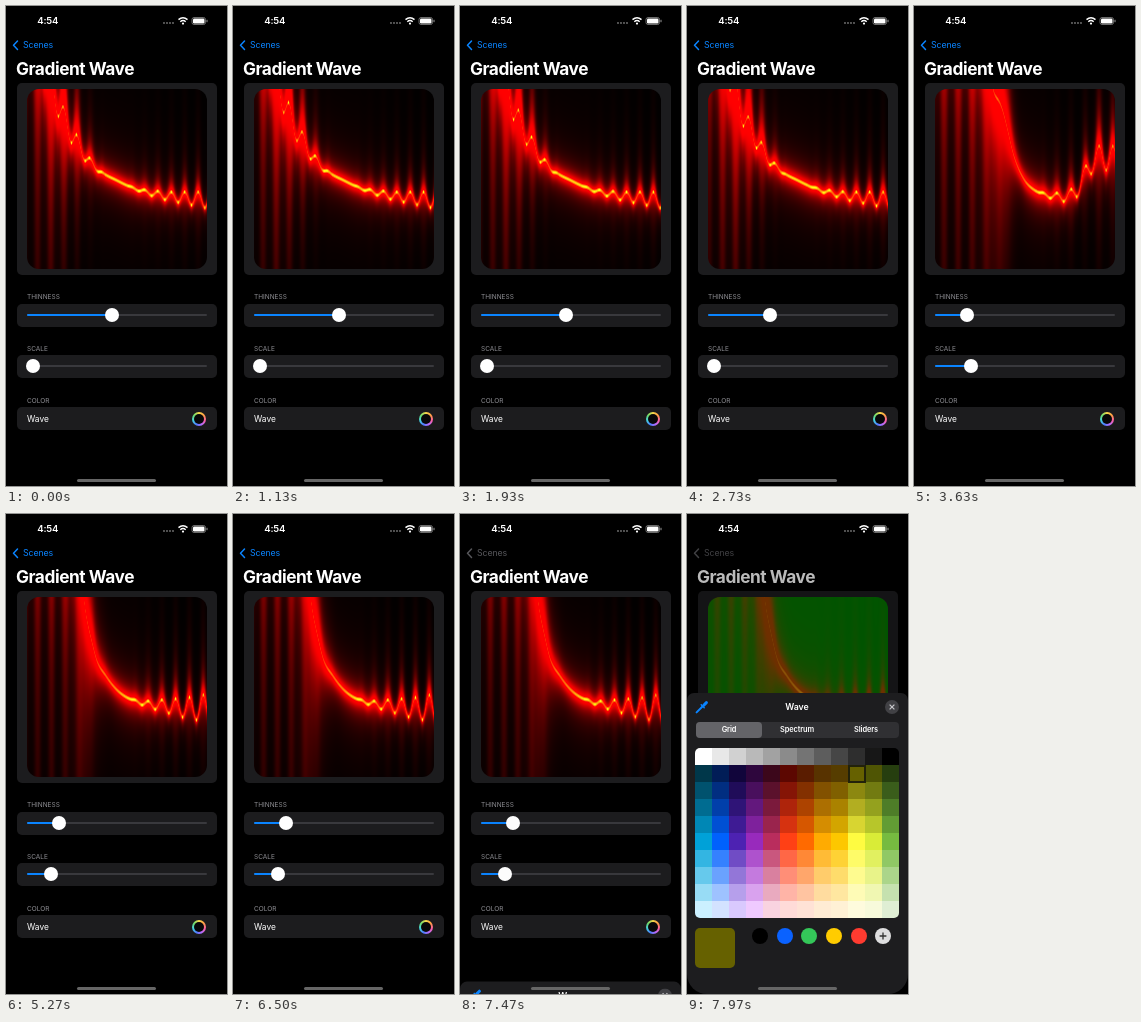
Animation, 221 px wide and 480 px high, one loop 8000 ms. Source, as an HTML page with a canvas:

```html
<!DOCTYPE html>
<html lang="en">
<head>
<meta charset="utf-8">
<title>Gradient Wave</title>
<style>
html, body { margin: 0; width: 100%; height: 100%; overflow: hidden; background: #000; }
#stage { position: relative; width: 221px; height: 480px; overflow: hidden; background: #000; color: #fff; font-family: Inter, Roboto, sans-serif; }
#stage * { position: absolute; box-sizing: border-box; }
.t { white-space: nowrap; line-height: 12px; }
.time { left: 31.3px; top: 9px; font-size: 9.6px; font-weight: 600; letter-spacing: -.2px; }
.status { left: 0; top: 0; }
.back { left: 17px; top: 33px; font-size: 8.8px; letter-spacing: -.1px; color: #0a84ff; }
.title { left: 10px; top: 53px; line-height: 20px; font-size: 17.3px; font-weight: 700; letter-spacing: -.45px; }
.card { left: 11px; width: 200px; height: 23px; border-radius: 5px; background: #1c1c1e; }
.label { left: 21px; font-size: 6.5px; color: #8e8e93; }
canvas { left: 21px; top: 83px; border-radius: 12px; }
.track { left: 10px; top: 10px; width: 180px; height: 2px; border-radius: 1px; background: #39393d; }
.fill { left: 0; top: 0; height: 2px; border-radius: 1px; background: #0a84ff; }
.knob { top: -6px; width: 14px; height: 14px; margin-left: -7px; border-radius: 50%; background: #fff; }
.ring { left: 186px; top: 405.5px; width: 14px; height: 14px; border-radius: 50%; background: conic-gradient(#f9d84a, #ff9f43, #ff5fa2, #b26bff, #4c7dff, #45d6e0, #6fdc6a, #f9d84a); }
.hole { left: 2px; top: 2px; width: 10px; height: 10px; border-radius: 50%; background: #08080a; }
#dim { left: 0; top: 26px; width: 221px; height: 454px; background: #000; opacity: 0; }
#sheet { left: 0; top: 179px; width: 221px; height: 301px; border-radius: 7px 7px 20px 20px; background: #1d1d1f; overflow: hidden; }
.mid { width: 66px; text-align: center; }
.seg { left: 9px; top: 29px; width: 203px; height: 16px; border-radius: 4px; background: #303033; }
.on { left: 0; top: 0; width: 66px; height: 16px; border-radius: 4px; background: #646468; }
.seg .t { top: 2px; font-size: 7.4px; font-weight: 600; letter-spacing: -.1px; }
#grid { left: 8px; top: 55px; width: 204px; height: 170px; border-radius: 5px; overflow: hidden; }
#grid i { width: 17px; height: 17px; }
#pick { left: 161px; top: 72px; width: 18px; height: 18px; border: 2px solid #22220a; }
#swatch { left: 8px; top: 235px; width: 40px; height: 40px; border-radius: 5px; }
.dot { top: 235px; width: 16px; height: 16px; border-radius: 50%; }
.home { left: 71px; top: 473px; width: 79px; height: 2.5px; border-radius: 2px; background: #666; }
</style>
</head>
<body>
<div id="stage">
  <svg class="status" width="221" height="50" fill="none" stroke-linecap="round">
    <path d="M11.5 35L7.5 39.2L11.5 43.4" id="chevron" stroke="#0a84ff" stroke-width="1.5" stroke-linejoin="round"/>
  </svg>
  <div class="t back" id="back">Scenes</div>
  <div class="t title">Gradient Wave</div>
  <div class="card" style="top:77px;height:192px"></div>
  <canvas id="wave" width="180" height="180"></canvas>
  <div class="t label" style="top:285px">THINNESS</div>
  <div class="card" style="top:298px"><div class="track"><div class="fill" id="thinFill"></div><div class="knob" id="thinKnob"></div></div></div>
  <div class="t label" style="top:336.5px">SCALE</div>
  <div class="card" style="top:349px"><div class="track"><div class="fill" id="scaleFill"></div><div class="knob" id="scaleKnob"></div></div></div>
  <div class="t label" style="top:388.5px">COLOR</div>
  <div class="card" style="top:401px"></div>
  <div class="t" style="left:21px;top:407px;font-size:8.4px">Wave</div>
  <div class="ring"><div class="hole"></div></div>
  <div id="dim"></div>
  <div class="t time">4:54</div>
  <svg class="status" width="221" height="28" fill="none">
    <g fill="#777"><circle cx="158" cy="17" r=".9"/><circle cx="161" cy="17" r=".9"/><circle cx="164" cy="17" r=".9"/><circle cx="167" cy="17" r=".9"/></g>
    <path d="M172.5 13.6Q177 9.8 181.5 13.6M174.3 15.7Q177 13.4 179.7 15.7" stroke="#fff" stroke-width="1.5"/>
    <circle cx="177" cy="17.6" r="1.1" fill="#fff"/>
    <rect x="186" y="11.5" width="13.5" height="7" rx="2" stroke="#888" stroke-width=".8"/>
    <rect x="187" y="12.5" width="11.5" height="5" rx="1.2" fill="#fff"/>
    <path d="M201 13.8v2.4" stroke="#999"/>
  </svg>
  <div id="sheet">
    <svg style="left:8px;top:7px" width="14" height="14" fill="none" stroke="#0a84ff" stroke-linecap="round">
      <path d="M1.6 12.4L7.2 6.8" stroke-width="2"/><path d="M6.2 4.8L9.2 7.8" stroke-width="1.5"/><path d="M8.8 5.2L11.4 2.6" stroke-width="3"/>
    </svg>
    <div class="t mid" style="left:77px;top:8px;font-size:8.8px;font-weight:600">Wave</div>
    <svg style="left:198px;top:7px" width="14" height="14"><circle cx="7" cy="7" r="7" fill="#414145"/><path d="M4.6 4.6L9.4 9.4M9.4 4.6L4.6 9.4" stroke="#c4c4c8" stroke-width="1.2"/></svg>
    <div class="seg">
      <div class="on"></div>
      <div class="t mid" style="left:0">Grid</div>
      <div class="t mid" style="left:68px">Spectrum</div>
      <div class="t mid" style="left:137px">Sliders</div>
    </div>
    <div id="grid"></div>
    <div id="pick"></div>
    <div id="swatch"></div>
    <div class="dot" style="left:65px;background:#000"></div>
    <div class="dot" style="left:90px;background:#0a62ff"></div>
    <div class="dot" style="left:114px;background:#34c759"></div>
    <div class="dot" style="left:139px;background:#ffcc00"></div>
    <div class="dot" style="left:164px;background:#ff3b30"></div>
    <svg style="left:188px;top:235px" width="16" height="16"><circle cx="8" cy="8" r="8" fill="#dededf"/><path d="M8 4.6v6.8M4.6 8h6.8" stroke="#333" stroke-width="1.3"/></svg>
  </div>
  <div class="home"></div>
</div>
<script>
const LOOP = 8000, SIZE = 180;
const $ = id => document.getElementById(id);
const ctx = $('wave').getContext('2d');
const img = ctx.createImageData(SIZE, SIZE);
const clamp = (v, a = 0, b = 1) => Math.min(b, Math.max(a, v));
const mix = (a, b, k) => a + (b - a) * k;
const smooth = k => k * k * (3 - 2 * k);

// Wave shape at three scale settings: base heights every 10px, then
// left node, left gain, right node, right gain, period, crest.
const shapes = [
  { base: [-40, 20, 62, 92, 118, 135, 151, 162, 169, 174, 179, 183, 186, 188, 190, 191, 192, 193, 194],
    osc: [99, .28, 120, .1, 13.4, 138.5] },
  { base: [-70, -65, -60, -50, -30, 15, 98, 144, 162, 175, 183, 187, 190, 191, 192, 193, 194, 194, 194],
    osc: [92, .2, 124, .18, 13.8, 142] },
  { base: [193, 192, 191, 190, 183, 150, 10, -70, 90, 165, 188, 194, 193, 188, 165, 60, -50, -70, -50],
    osc: [110, .16, 118, .22, 15.5, 135] }
];

function track(keys, t) {
  let i = 0;
  while (i < keys.length - 2 && t >= keys[i + 1][0]) i++;
  const [t0, a] = keys[i], [t1, b] = keys[i + 1];
  return mix(a, b, clamp((t - t0) / (t1 - t0)));
}

const thinKeys = [[0, 106], [2400, 106], [2730, 83], [3130, 53], [LOOP, 53]];
const scaleKeys = [[0, 27], [3370, 27], [4170, 119], [4530, 119], [5130, 45], [LOOP, 45]];
const driftKeys = [[0, 0], [1130, -1.5], [2730, 4], [4370, 0], [4530, 0], [5270, 0], [6500, -1], [7070, -1.4], [LOOP, -1.4]];

function curve(p, x) {
  const u = clamp((x - 20) / 10, 0, 17.999), i = Math.floor(u), k = u - i;
  const a = p[Math.max(0, i - 1)], b = p[i], c = p[i + 1], d = p[Math.min(18, i + 2)];
  return b + .5 * k * (c - a + k * (2 * a - 5 * b + 4 * c - d + k * (3 * (b - c) + d - a)));
}

function drawWave(thin, scale, drift, olive) {
  const s = scale < 45 ? (scale - 27) / 18 : 1 + (scale - 45) / 74;
  const n = Math.min(1, Math.floor(s)), lo = shapes[n], hi = shapes[n + 1];
  const blend = key => lo[key].map((v, i) => mix(v, hi[key][i], s - n));
  const base = blend('base');
  const [nl, kl, nr, kr, period, crest] = blend('osc');
  const amp = x => Math.min(14, kl * Math.max(0, nl - x) + kr * Math.max(0, x - nr));
  const swing = x => Math.cos((x - crest - drift) / period * 2 * Math.PI);
  const height = x => curve(base, x) - amp(x) * swing(x);
  const width = 7 + (106 - thin) * .03;
  for (let i = 0; i < SIZE; i++) {
    const x = i + 21.5, y0 = height(x), slope = height(x + .5) - height(x - .5);
    const beam = mix(1, .45 + .9 * (.5 + .5 * swing(x)) ** 1.5, clamp(amp(x) / 8));
    const boost = 1 + 8 * smooth(clamp((172 - curve(base, x)) / 110));
    const w = width * beam * boost;
    const heat = .1 + .9 / (1 + slope ** 2);
    for (let j = 0; j < SIZE; j++) {
      const d = Math.abs(j + 83.5 - y0), q = (j * SIZE + i) * 4;
      const red = 1 - Math.exp(-1.2 * (w / Math.max(.4, d)) ** 1.5);
      const hot = heat * clamp(1.25 - d / 2);
      img.data[q] = red * (olive ? 150 : 255) + (olive ? 90 * hot : 0);
      img.data[q + 1] = olive ? 115 - 50 * red + 110 * hot : 255 * hot;
      img.data[q + 2] = 20 * hot;
      img.data[q + 3] = 255;
    }
  }
  ctx.putImageData(img, 0, 0);
}

function buildGrid() {
  const dark = '00374a 011d57 11053b 2e063d 3c071b 5c0701 5a1c00 583300 563d00 666100 4f5504 263e0f'.split(' ');
  const pure = '00a1d8 0061fd 4d22b2 982abc b92d5d ff4015 ff6a00 ffab01 fdc700 fefb41 d9ec37 76bb40'.split(' ');
  const pale = 'cbf0ff d3e2ff d9c9fe efcaff f9d3e0 ffdbd8 ffe2d6 ffecd4 fff1d5 fefbdd f7fadb dfeed4'.split(' ');
  const rgb = h => [0, 2, 4].map(i => parseInt(h.slice(i, i + 2), 16));
  for (let r = 0; r < 10; r++) for (let c = 0; c < 12; c++) {
    const a = rgb(r < 5 ? dark[c] : pure[c]), b = rgb(r < 5 ? pure[c] : pale[c]);
    const k = r < 5 ? (r - 1) / 4 : (r - 5) / 4, gray = 255 * (1 - c / 11);
    const col = r ? a.map((v, i) => mix(v, b[i], k)) : [gray, gray, gray];
    const cell = document.createElement('i');
    cell.style.cssText = `left:${c * 17}px;top:${r * 17}px;background:rgb(${col.map(Math.round)})`;
    $('grid').append(cell);
  }
}

function setSlider(name, x) {
  $(name + 'Fill').style.width = x - 21 + 'px';
  $(name + 'Knob').style.left = x - 21 + 'px';
}

let start;
function frame() {
  const now = performance.now();
  start ??= now;
  const t = (now - start) % LOOP;
  const thin = track(thinKeys, t), scale = track(scaleKeys, t);
  const olive = t >= 7870;
  setSlider('thin', thin);
  setSlider('scale', scale);
  drawWave(thin, scale, track(driftKeys, t), olive);
  const open = 1 - (1 - clamp((t - 7465) / 400)) ** 3;
  $('sheet').style.transform = `translateY(${302 * (1 - open)}px)`;
  $('dim').style.opacity = .27 * open;
  const tint = open > 0 ? '#58585c' : '#0a84ff';
  $('back').style.color = tint;
  $('chevron').style.stroke = tint;
  $('pick').style.visibility = olive ? 'visible' : 'hidden';
  $('swatch').style.background = olive ? '#666100' : '#000';
  requestAnimationFrame(frame);
}
buildGrid();
frame();
</script>
</body>
</html>
```
